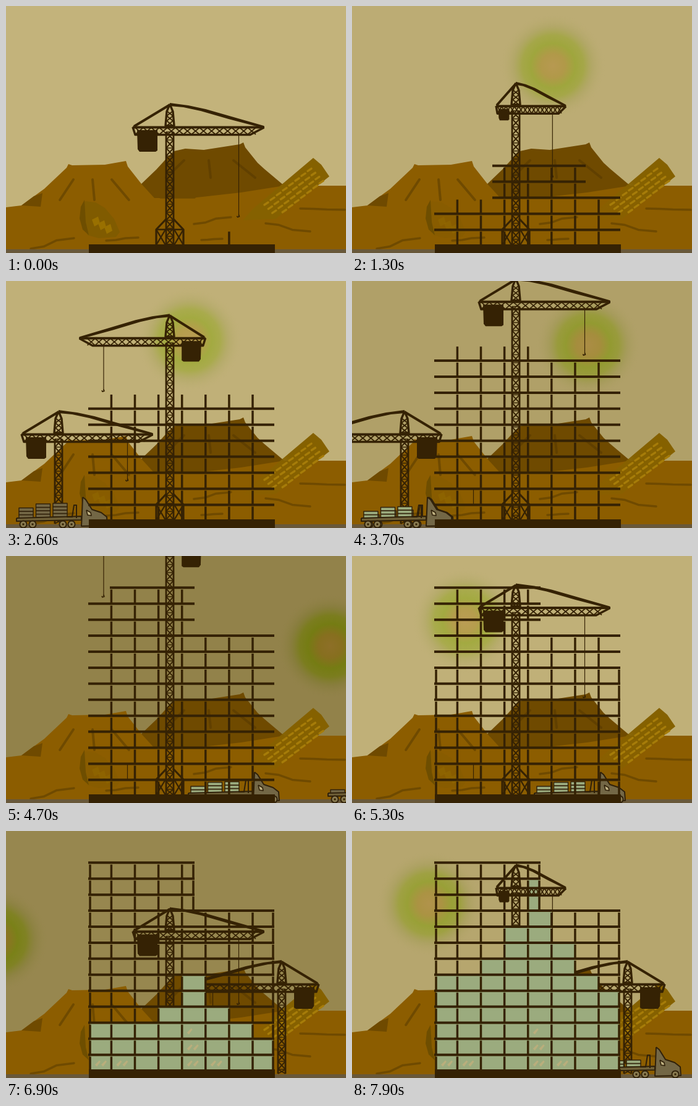
An HTML page with a canvas that plays this animation: 550 px wide and 400 px high, repeating every 8 s.

```html
<!DOCTYPE html>
<html lang="en">
<head>
<meta charset="utf-8">
<title>Building site</title>
<style>
html, body { margin: 0; width: 100%; height: 100%; overflow: hidden; background: #c3b37b; }
canvas { display: block; width: 550px; height: 400px; }
</style>
</head>
<body>
<canvas id="stage" width="550" height="400"></canvas>
<script>
// All times are in ticks of 100 ms.
const ctx = document.getElementById('stage').getContext('2d');
ctx.lineJoin = 'round';
const INK = '#352204', GROUND = '#8c5d00', SHADE = '#6f4a00', GLASS = '#9bab7e', OLIVE = '#736746';
const DAY = 12.5, REBUILD = 50, SPEED = 28;
const MAIN_TURNS = [4, 10.3, 21, 32, 42, 49, 54, 63, 77.7];
const SIDE_TURNS = [28, 47, 64];
const GLASS_ROWS = [6, 6, 7, 9, 12, 8, 6, 5];
const TRUCKS = [
  { arrive: 22, leave: 38, stop: 124, hop: 0, full: 1, cargo: OLIVE },
  { arrive: 47, leave: 66, stop: 402, hop: 101, full: .8, cargo: GLASS },
  { arrive: 75, leave: 90, stop: 492, hop: 0, full: .5, cargo: GLASS }
];

const clamp = (v, lo, hi) => Math.min(hi, Math.max(lo, v));
const ramp = (t, a, b) => clamp((t - a) / (b - a), 0, 1);
const swing = (turns, t) => turns.reduce((s, at) => s * Math.cos(Math.PI * ramp(t, at, at + 4)), 1);
const colX = i => clamp(132.3 + 38.1 * i, 136, 432);
const floorY = k => 388.3 - 25.92 * k;

function trace(p) {
  ctx.beginPath();
  for (let i = 0; i < p.length; i += 2) ctx.lineTo(p[i], p[i + 1]);
}
function poly(color, ...p) {
  trace(p);
  ctx.closePath();
  ctx.fillStyle = color;
  ctx.fill();
}
function line(width, ...p) {
  trace(p);
  ctx.lineWidth = width;
  ctx.stroke();
}
function cross(width, x0, y0, x1, y1) {
  line(width, x0, y0, x1, y1);
  line(width, x0, y1, x1, y0);
}
function rect(color, x, y, w, h) {
  ctx.fillStyle = color;
  ctx.fillRect(x, y, w, h);
}

function sky(t) {
  const phase = (t - 13 + DAY * 1.5) % DAY - DAY / 2;
  const d = t < 3 ? 0 : 27 * (1 - Math.cos(2 * Math.PI * (phase - 1.5) / DAY));
  const shade = (r, g, b, a) => `rgba(${r - d},${g - d},${b - d},${a})`;
  rect(shade(195, 179, 123, 1), 0, 0, 550, 400);
  if (t < DAY / 2) return;
  const x = 325 - 57 * phase, y = 95.5 + .00088 * (x - 285) ** 2;
  const g = ctx.createRadialGradient(x, y, 0, x, y, 86);
  g.addColorStop(0, shade(190, 160, 88, 1));
  g.addColorStop(.22, shade(184, 160, 80, 1));
  g.addColorStop(.42, shade(166, 173, 68, 1));
  g.addColorStop(.58, shade(168, 173, 72, .85));
  g.addColorStop(.74, shade(176, 170, 98, .5));
  g.addColorStop(1, shade(195, 179, 123, 0));
  ctx.fillStyle = g;
  ctx.fillRect(x - 90, y - 90, 180, 180);
}

function fallenTower(faded) {
  const g = ctx.createLinearGradient(385, 345, 460, 288);
  g.addColorStop(0, faded ? 'rgba(134,98,0,.15)' : '#856100');
  g.addColorStop(1, '#856100');
  poly(g, 497, 246, 510, 257, 523, 276, 436, 345, 383, 347, 400, 328);
  ctx.strokeStyle = '#a67c09';
  for (let i = 0; i < 8; i++) for (let j = 0; j < 4; j++) {
    const x = 421 + i * 10 + j * 6.4, y = 320 - i * 7.8 + j * 6.6;
    if (y < 336) line(3.4, x - 3, y + 2, x + 3, y - 2);
  }
}
function brokenDome(faded) {
  ctx.globalAlpha = faded ? .35 : 1;
  poly('#805b00', 128, 316, 145, 318, 160, 327, 175, 345, 184, 366, 178, 374, 150, 376, 132, 371, 122, 345);
  for (let i = 0; i < 3; i++) {
    const x = 145 + i * 10, y = 348 + i * 6;
    poly('#997000', x - 6, y - 2, x + 4, y - 7, x + 7, y + 4, x - 2, y + 9);
  }
  ctx.globalAlpha = 1;
  poly('#6e4e00', 127, 314, 121, 325, 119, 344, 124, 362, 134, 371, 129, 350);
}
function slopeCracks(x, y, spread, drop) {
  for (let i = -1; i <= 1; i++) line(4, x + spread * i, y, x + 3 + spread * 1.8 * i, y + drop);
}
function land(t) {
  poly(SHADE, 219, 288, 243, 265, 265, 241, 272, 235, 290, 231, 320, 233, 378, 224, 384, 221, 387, 229,
    407, 254, 418, 264, 450, 291, 440, 315, 220, 315);
  poly(GROUND, 0, 326, 25, 323, 62, 296, 98, 262, 101, 256, 107, 258, 160, 257, 194, 251, 197, 260, 219, 288,
    240, 311, 300, 311, 380, 302, 450, 291, 550, 291, 550, 400, 0, 400);
  poly(SHADE, 25, 323, 45, 308, 59, 303, 56, 325);
  ctx.lineCap = 'round';
  ctx.strokeStyle = SHADE;
  slopeCracks(140, 281, 31, 33);
  // loose debris: x, y, length, rise
  for (const [x, y, len, rise] of [[40, 393, 70, 17], [162, 380, 52, 5], [250, 310, 55, 0], [304, 353, 60, 11],
    [316, 379, 34, 2], [420, 352, 72, -13], [476, 328, 72, -2]]) {
    line(3.5, x, y, x + len * .3, y - rise * .2, x + len * .6, y - rise * .8, x + len, y - rise);
  }
  ctx.strokeStyle = '#614000';
  slopeCracks(328, 250, 40, 28);
  fallenTower(t >= 1);
  ctx.lineCap = 'butt';
  brokenDome(t >= 1);
  rect('#68583a', 0, 394, 550, 6);
}

function mast(x, top, bottom) {
  if (bottom <= top) return;
  ctx.strokeStyle = INK;
  for (const side of [-6, 6]) line(2.8, x + side, top, x + side, bottom);
  for (let y = top; y < bottom; y += 13) {
    cross(1.9, x - 6, y, x + 6, Math.min(y + 13, bottom));
    line(1.5, x - 6, y, x + 6, y);
  }
}
function jib(x, y, s) {
  const px = v => x + v * s;
  ctx.strokeStyle = INK;
  // head
  line(3.4, x, y + 1, x - 5, y + 13, x - 7, y + 36, x + 7, y + 36, x + 5, y + 13, x, y + 1);
  for (let h = 12; h < 36; h += 8) cross(1.8, x - 5, y + h, x + 5, y + h + 8);
  // stays
  line(4, px(-58), y + 37, x, y + 2);
  poly(INK, x, y - 1, px(30), y + 3, px(58), y + 9, px(152), y + 36, px(152), y + 40, px(95), y + 25,
    px(50), y + 12, px(22), y + 6, x, y + 4);
  // boom
  line(4, px(-60), y + 38.5, px(153), y + 38.5);
  line(3.5, px(-60), y + 38, px(-56), y + 50.5, px(130), y + 50.5, px(152), y + 39);
  for (let v = -56; v < 128; v += 13) cross(1.7, px(v), y + 39, px(v + 13), y + 50);
  // counterweight
  const b = y + 52 + 26 * Math.abs(s) ** 1.6;
  poly(INK, px(-53), y + 43, px(-20), y + 43, px(-20), b - 2, px(-23), b, px(-49), b, px(-52), b - 4);
}
function rope(x, y, s, len) {
  const hx = x + 111.5 * s, end = y + 51 + len;
  ctx.strokeStyle = INK;
  line(1.2, hx, y + 51, hx, end);
  line(1.6, hx, end - 3, hx + 1, end, hx - 2, end + 1, hx - 3, end - 1);
}
function mastFoot() {
  ctx.strokeStyle = INK;
  for (const d of [-1, 1]) {
    line(3.2, 265 + 5 * d, 344, 265 + 22 * d, 362, 265 + 22 * d, 387);
    line(2.6, 265, 362, 265 + 22 * d, 362);
    cross(2.4, 265 + 7 * d, 362, 265 + 22 * d, 387);
  }
}

function wheel(x) {
  ctx.beginPath();
  ctx.arc(x, 394, 5.6, 0, 7);
  ctx.fillStyle = '#8a7c52';
  ctx.fill();
  ctx.lineWidth = 2;
  ctx.stroke();
  rect(INK, x - 1.5, 392.5, 3, 3);
}
function truck({ arrive, leave, stop, hop, full, cargo }, t) {
  const x = stop - SPEED * Math.max(0, arrive - t) + hop * ramp(t, leave - 10, leave - 7) + SPEED * 2 * Math.max(0, t - leave);
  if (x < -45 || x > 660) return;
  const load = full * (1 - .65 * ramp(t, leave - 6, leave));
  ctx.strokeStyle = '#30210a';
  for (let i = 0; i < 3; i++) {
    const rows = Math.round((i ? 4 : 2.6) * load), left = x - 103 + 27.5 * i;
    for (let r = 1; r <= rows; r++) {
      rect(cargo, left, 384 - i - r * 5.5, 23, 5.5);
      ctx.lineWidth = 1.4;
      ctx.strokeRect(left, 384 - i - r * 5.5, 23, 5.5);
    }
  }
  const bed = [x - 107, 384, x - 2, 381, x - 2, 387, x - 107, 389, x - 107, 384];
  poly('#6f6038', ...bed);
  line(2, ...bed);
  line(2, x - 26, 382, x - 17, 382, x - 14, 363, x - 10, 363, x - 10, 384);
  const cab = [x, 350, x + 5, 354, x + 15, 370, x + 30, 375, x + 39, 382, x + 40, 396, x - 2, 397, x - 1, 375, x, 350];
  poly(OLIVE, ...cab);
  line(2, ...cab);
  const pane = [x + 6, 371, x + 13, 375, x + 14, 380, x + 8, 379, x + 6, 371];
  poly('#c0b283', ...pane);
  line(1.6, ...pane);
  [-96, -81, -32, -18, 31].forEach(dx => wheel(x + dx));
}

function glint(x, y, n) {
  for (let i = 0; i < n; i++, x += 10) poly('#b9ae7c', x, y + 8, x + 7, y + 1, x + 9, y + 3, x + 3, y + 11);
}
function glazing(t) {
  GLASS_ROWS.forEach((rows, i) => {
    const start = 58 + .6 * i, x = colX(i);
    if (t < start) return;
    const n = Math.floor(1 + (rows - 1) * ramp(t, start, 79));
    for (let k = 0; k < n; k++) {
      rect(GLASS, x, floorY(k + 1), (k > 9 ? 303 : colX(i + 1)) - x, 26);
      if (k === 0 && i % 4 < 2 || i === 4 && k < 3) glint(x + 8, floorY(k + 1) + 8, k < 2 ? 2 : 1);
    }
  });
}

// Floors start in the middle, then reach the right and the left edge.
const midTime = k => k < 8 ? 2.4 * k : 3 * k + (k < 11 ? 3 : 6);
const rightTime = k => k < 8 ? 2 + 2.9 * k : midTime(k) + 1;
const leftTime = k => k < 8 ? 8 + 2.4 * k : midTime(k) + 2;

function frame(t) {
  ctx.strokeStyle = INK;
  const beam = (x0, x1, k) => line(4, x0, floorY(k), x1, floorY(k));
  const post = (x, k) => line(3.5, x, floorY(k - 1), x, floorY(k) + 3);
  for (let k = 1; k <= 13; k++) {
    const tall = k > 10, mid = midTime(k);
    if (t >= mid) beam(tall ? (k > 12 && t < 49 ? 168 : 133) : 227, tall ? 305 : 378, k);
    if (!tall && t >= rightTime(k)) beam(378, 434, k);
    if (!tall && t >= leftTime(k)) beam(133, 227, k);
    for (let i = 1; i <= (tall ? 4 : 7); i++) {
      const low = i < 3 ? leftTime(k) - 2.4 : i === 7 ? rightTime(k) : mid;
      if (t >= (k < 8 ? low : mid - 2) || k === 1 && i === 6) post(colX(i), k);
    }
    if (t >= 48 + k * .6) {
      post(136, k);
      post(tall ? 303 : 432, k);
    }
  }
}

function draw(t) {
  sky(t);
  land(t);
  const sideX = t < REBUILD ? 85 : 446;
  const sideY = 430 - 220 * (ramp(t, 13, 20) - ramp(t, 39, 45) + ramp(t, 56, 59.5));
  const sideS = swing(SIDE_TURNS, t);
  if (sideY < 420) {
    mast(sideX, sideY + 46, 393);
    jib(sideX, sideY, sideS);
    rope(sideX, sideY, sideS, 62);
  }
  const climb = 158 - 5.35 * clamp(t - 6.6, 0, 41), sink = ramp(t, REBUILD, 57);
  const y = climb + (188 - climb) * sink - 7.05 * Math.max(0, t - 60);
  const s = .98 * swing(MAIN_TURNS, t) + .02;
  mast(265, y + 46, 387);
  mastFoot();
  rope(265, y, s, Math.max(73, 132 - 2.3 * (t < REBUILD ? t : Math.max(0, t - 57))));
  TRUCKS.forEach(v => truck(v, t));
  ctx.strokeStyle = INK;
  if (t >= 30) line(1.2, 196.5, 336, 196.5, 362);
  glazing(t);
  frame(t);
  jib(265, y, s);
  rect(INK, 134, 386, 301, 14);
}

let last = -1;
function tick() {
  const t = Math.floor(performance.now() % 8000 / 100);
  if (t !== last) draw(last = t);
  requestAnimationFrame(tick);
}
tick();
</script>
</body>
</html>
```
